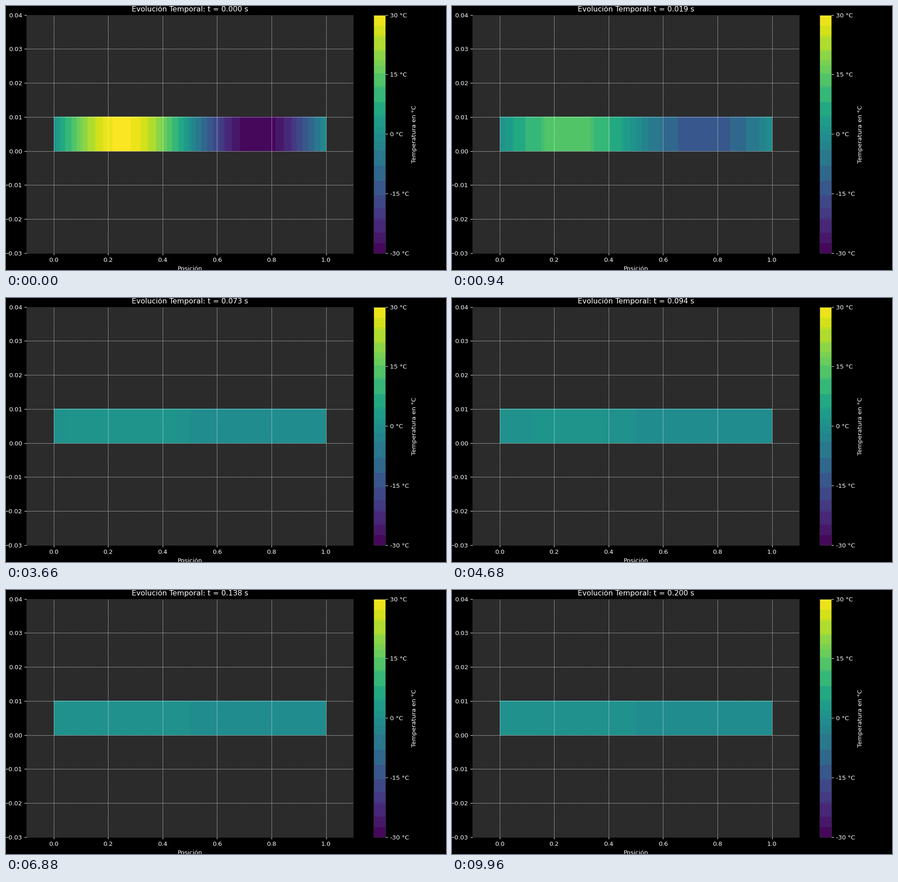
A matplotlib script that plays this animation: 966 by 580 pixels, repeating every 10000 ms.

```python
import matplotlib.pyplot as plt
import numpy as np
from matplotlib.animation import FuncAnimation
from matplotlib.patches import Rectangle

WIDTH, HEIGHT, DPI = 966, 580, 96
FRAMES, INTERVAL, T_END = 500, 20, 0.2
PEAK = 30
PANEL = "#2b2b2b"

# Plot area and colour scale, in pixels from the top left corner
LEFT, RIGHT, TOP, BOTTOM = 44.92, 762.28, 19.67, 542.71
X_STEP = (RIGHT - LEFT) / 6
X0 = LEFT + X_STEP / 2
Y_STEP = (BOTTOM - TOP) / 7
BAR_LEFT, BAR_RIGHT, BAR_TOP, BAR_BOTTOM = 105, 703, 243, 319
SCALE_LEFT, SCALE_RIGHT = 807.11, 833.27
MIDDLE = (TOP + BOTTOM) / 2

PT = DPI / 72
TICK, LABEL_GAP, LINE = 3.5 * PT, 7 * PT, 0.8

# Temperatures where one flat colour gives way to the next
EDGES = np.array([-30, -27.55, -24.85, -21.7, -21.05, -18.7, -15.5, -11.8,
                  -8.05, -4.05, -1.8, 0, 0.49, 1.8, 4, 4.67, 8, 11.7, 12.25,
                  15.25, 17.2, 18.6, 20.75, 21.25, 24.3, 24.9, 27.3, 29.36,
                  30])
MIDS = (EDGES[:-1] + EDGES[1:]) / 2
COLORS = plt.get_cmap("viridis")((MIDS + PEAK) / (2 * PEAK))


def shade(temps):
    return COLORS[np.digitize(temps, EDGES[1:-1])]


def heat(t):
    """Exact solution of the heat equation for one sine period."""
    return PEAK * np.exp(-4 * np.pi**2 * t) * np.sin(2 * np.pi * bar_x)


def label(x, y, text, ha="center", va="center_baseline", **kw):
    return ax.text(x, y, text, color="white", ha=ha, va=va, **kw)


def box(left, right, **kw):
    ax.add_patch(Rectangle((left, TOP), right - left, BOTTOM - TOP, **kw))


def show(pixels, extent):
    return ax.imshow(pixels, extent=extent, aspect="auto",
                     interpolation="nearest", zorder=0)


fig = plt.figure(figsize=(WIDTH / DPI, HEIGHT / DPI), dpi=DPI,
                 facecolor="black")
ax = fig.add_axes([0, 0, 1, 1])
ax.axis("off")

outline = dict(fill=False, edgecolor=PANEL, lw=LINE, zorder=3)
box(LEFT, RIGHT, facecolor=PANEL, edgecolor="none", zorder=-1)
box(LEFT, RIGHT, **outline)
box(SCALE_LEFT, SCALE_RIGHT, **outline)

bar_x = (np.arange(BAR_LEFT, BAR_RIGHT) + 0.5 - X0) / (5 * X_STEP)
bar = show(shade(heat(0))[None], (BAR_LEFT, BAR_RIGHT, BAR_BOTTOM, BAR_TOP))

rows = np.arange(20, 543) + 0.5
scale = (MIDDLE - rows) / (BOTTOM - TOP) * 2 * PEAK
show(shade(scale)[:, None], (807, 833, 543, 20))

x_ticks = X0 + X_STEP * np.arange(6)
y_ticks = TOP + Y_STEP * np.arange(8)
scale_ticks = np.linspace(TOP, BOTTOM, 5)

grid = dict(colors="white", linestyles="--", lw=0.5, zorder=2)
ax.vlines(x_ticks, BOTTOM, TOP, **grid)
ax.hlines(y_ticks[1:-1], LEFT, RIGHT, **grid)

marks = dict(colors="white", lw=LINE, zorder=4)
ax.vlines(x_ticks, BOTTOM, BOTTOM + TICK, **marks)
ax.hlines(y_ticks, LEFT - TICK, LEFT, **marks)
ax.hlines(scale_ticks, SCALE_RIGHT, SCALE_RIGHT + TICK, **marks)

for k, x in enumerate(x_ticks):
    label(x, BOTTOM + LABEL_GAP, f"{k / 5:.1f}", va="top")
for k, y in enumerate(y_ticks):
    text = f"{(4 - k) / 100:.2f}".replace("-", "\u2212")
    label(LEFT - LABEL_GAP, y, text, ha="right")
for k, y in enumerate(scale_ticks):
    label(SCALE_RIGHT + LABEL_GAP, y, f"{30 - 15 * k} °C", ha="left")

center = (LEFT + RIGHT) / 2
label(center, 571, "Posición", va="top")
label(890, MIDDLE, "Temperatura en °C", va="top", rotation=90,
      rotation_mode="anchor")
title = label(center, TOP - 6 * PT, "", va="baseline", fontsize=12)

ax.set_xlim(0, WIDTH)
ax.set_ylim(HEIGHT, 0)


def update(i):
    t = T_END * i / (FRAMES - 1)
    bar.set_data(shade(heat(t))[None])
    title.set_text(f"Evolución Temporal: t = {t:.3f} s")
    return bar, title


anim = FuncAnimation(fig, update, frames=FRAMES, interval=INTERVAL,
                     repeat=True, repeat_delay=0)
plt.show()
```
